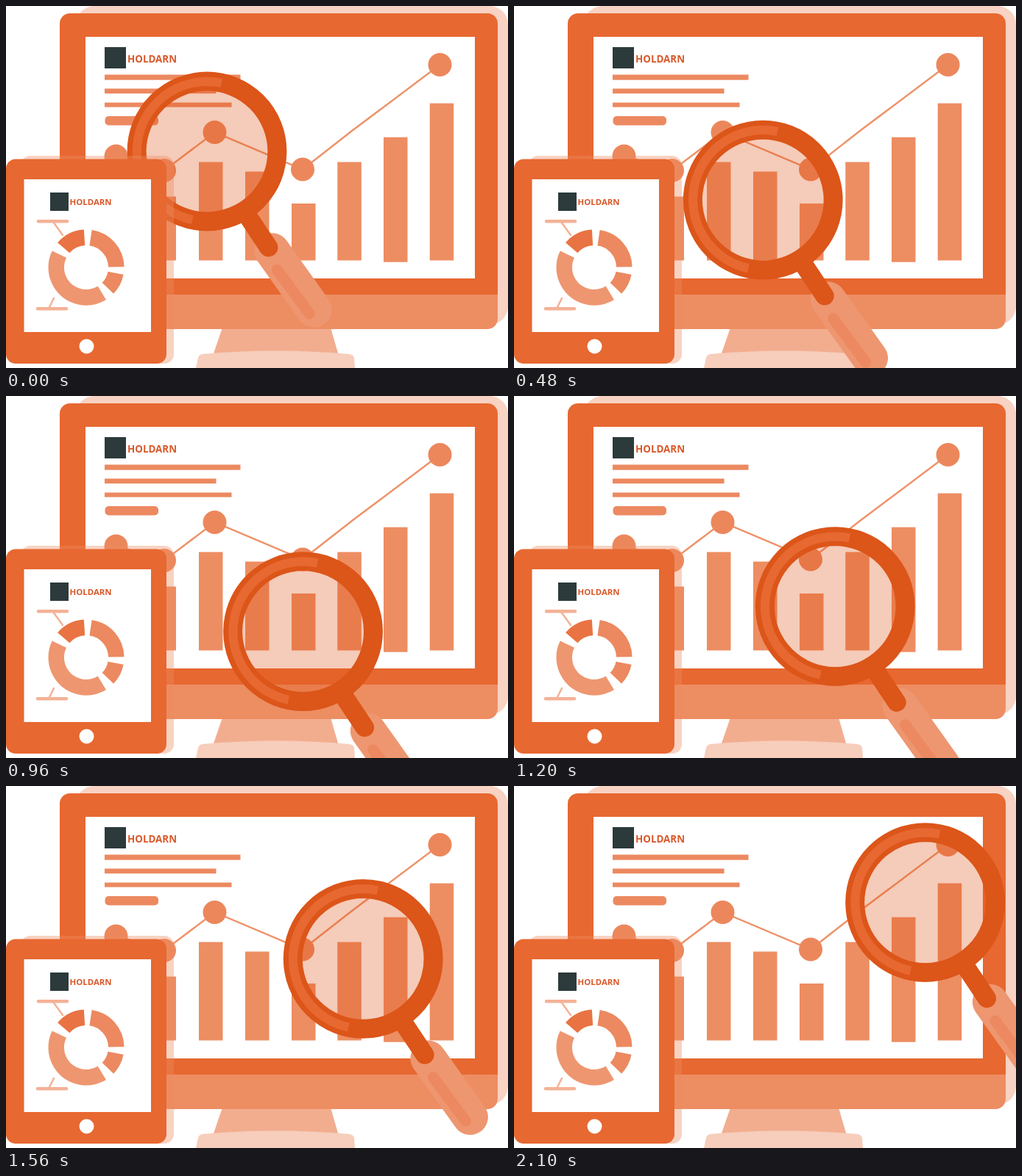
Animation of 682x493 px, one loop 4430 ms. Source, as an HTML page:

```html
<!DOCTYPE html>
<html lang="en">
<head>
<meta charset="utf-8">
<title>Chart inspection</title>
<style>
  html, body { margin: 0; width: 100%; height: 100%; overflow: hidden; background: #fff; }
  svg { display: block; width: 682px; height: 493px; }
  text { font-family: "Open Sans", "Noto Sans", sans-serif; font-weight: 700; fill: #d9592a; }
  .frame { fill: #e76831; }
  .soft { fill: #ed8d62; }
  .shadow { fill: #ec8960; opacity: .38; }
  .logo { fill: #2c3a3b; }
  .line { fill: none; stroke-linecap: round; }
</style>
</head>
<body>
<svg viewBox="0 0 682 493">
  <!-- Monitor -->
  <rect class="shadow" x="95" width="587" height="434" rx="25"/>
  <path fill="#f2ad8f" d="M294 438H441L452 476H281Z"/>
  <path fill="#f7cdbb" d="M258 493L261 479Q262 475 267 474Q366 465 466 474Q472 475 473 479L474 493Z"/>
  <rect class="soft" x="73" y="340" width="595" height="100" rx="14"/>
  <path class="frame" d="M73 393V24a14 14 0 0 1 14-14H654a14 14 0 0 1 14 14V393Z"/>
  <rect x="108" y="42" width="529" height="329" fill="#fff"/>
  <rect class="logo" x="134" y="56" width="29" height="29"/>
  <text x="165" y="76.5" font-size="13.4">HOLDARN</text>
  <g fill="#ec8960">
    <rect x="134" y="93.5" width="184.5" height="7.2"/>
    <rect x="134" y="112.5" width="151.5" height="6.7"/>
    <rect x="134" y="131.5" width="172.5" height="6.2"/>
    <rect x="134.5" y="150" width="72.5" height="12.5" rx="5"/>
  </g>
  <g id="bars" class="soft"></g>
  <path class="line" stroke="#ee9269" stroke-width="2.4" d="M150 204L215 224L283.5 172L403 222.5L470 170L589.5 80"/>
  <g id="dots" fill="#ec875c"></g>

  <!-- Magnifier, centred on its lens -->
  <g id="magnifier">
    <path class="line" stroke="#ee9670" stroke-width="48.5" d="M88.5 135.5L145.5 215.5"/>
    <path class="line" stroke="#ec8960" stroke-width="15" d="M95.3 161.3L139.3 221"/>
    <circle r="83" fill="#dc5519" opacity=".3"/>
    <path class="line" stroke="#dc5519" stroke-width="25.5" d="M56 89L83.7 130.7"/>
    <circle r="95.4" fill="none" stroke="#dc5519" stroke-width="26"/>
    <path fill="none" stroke="#e76831" stroke-width="12.2" transform="rotate(12)" d="M0 -95.2A95.2 95.2 0 0 0 0 95.2"/>
  </g>

  <!-- Tablet -->
  <rect class="shadow" x="20" y="204" width="208" height="283" rx="13"/>
  <rect class="frame" y="208.5" width="218" height="278.5" rx="13"/>
  <rect x="24.5" y="236" width="172.5" height="208" fill="#fff"/>
  <circle cx="109.5" cy="463.5" r="10" fill="#fff"/>
  <rect class="logo" x="60" y="254" width="25" height="25"/>
  <text x="86.5" y="270.5" font-size="11.4">HOLDARN</text>
  <g class="line" stroke="#f4b296">
    <path stroke-width="4.5" d="M44 293.3H83M43 412.3H82"/>
    <path stroke-width="2.5" d="M64 294L77 312M58.5 411L65 398"/>
  </g>
  <g id="donut" fill="none" stroke-width="21.5" transform="translate(109 356)"></g>
</svg>
<script>
const byId = id => document.getElementById(id);

function add(parent, tag, attributes) {
  const node = document.createElementNS("http://www.w3.org/2000/svg", tag);
  for (const name in attributes) node.setAttribute(name, attributes[name]);
  byId(parent).append(node);
}

// left, top, bottom
[[198.5, 259.5, 346.5], [262, 212.5, 346.5], [325, 225.5, 346.5], [388, 269, 346.5],
 [450.3, 212.5, 346.5], [513, 178.7, 348.7], [575.7, 132.5, 346.5]]
  .forEach(([x, y, bottom]) => add("bars", "rect", { x, y, width: 32.5, height: bottom - y }));

[[149.5, 204.5], [215, 224], [283.5, 172], [403, 222.5], [589.5, 80]]
  .forEach(([cx, cy]) => add("dots", "circle", { cx, cy, r: 16 }));

// start and end in degrees, colour
[[-81.5, -1, "#ec8960"], [11, 44, "#ec8960"], [58.5, 206, "#ee9670"], [221, 266.5, "#e97342"]]
  .forEach(([from, to, stroke]) => add("donut", "circle", {
    r: 40.8, stroke, pathLength: 360,
    "stroke-dasharray": `${to - from} 360`, transform: `rotate(${from})`
  }));

const LOOP = 4430, STEP = 30, TURN = 926, END = 2100;
const start = performance.now();

function draw() {
  const elapsed = (performance.now() - start) % LOOP;
  const t = Math.min(END, Math.floor(elapsed / STEP) * STEP);
  const x = 273 + 0.136 * t;
  const y = t < TURN ? 198 + 0.1377 * t : 325.5 - 0.1422 * (t - TURN);
  byId("magnifier").setAttribute("transform", `translate(${x} ${y})`);
  requestAnimationFrame(draw);
}
draw();
</script>
</body>
</html>
```
